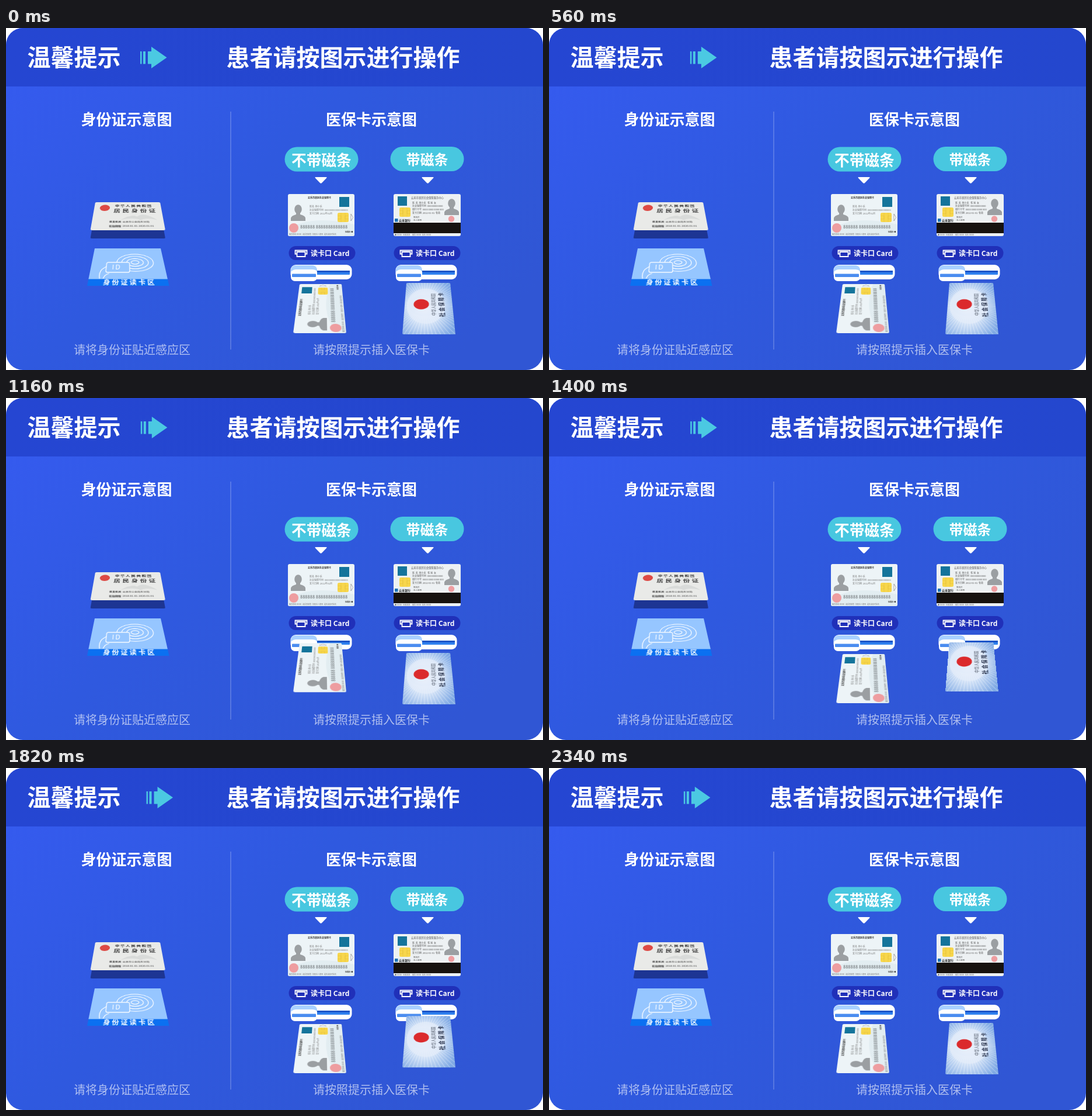
An HTML page for the animation above (2.36 s loop, 920 px wide and 585 px high).

```html
<!DOCTYPE html>
<html lang="zh-CN">
<head>
<meta charset="utf-8">
<title>温馨提示</title>
<style>
html, body { margin: 0; width: 100%; height: 100%; overflow: hidden; background: #fff; }
#stage { position: relative; width: 920px; height: 585px; overflow: hidden; }
svg { position: absolute; left: 0; top: 0; display: block; }
text { font-family: "Noto Sans CJK SC", "Noto Sans CJK", "Noto Sans", sans-serif; white-space: pre; }
.b { font-weight: 700; }
.warp { transform-origin: 0 0; overflow: hidden; }
.slot { position: absolute; left: 0; top: 418px; width: 920px; height: 167px; overflow: hidden; }
.slot > div { position: absolute; left: 0; top: -418px; }
</style>
</head>
<body>
<div id="stage">
<svg width="920" height="585">
  <defs>
    <linearGradient id="body" x1="0" y1="0" x2="1" y2=".75">
      <stop offset="0" stop-color="#365bf1"/><stop offset=".5" stop-color="#2f59df"/><stop offset="1" stop-color="#3056d4"/>
    </linearGradient>
    <linearGradient id="head"><stop offset="0" stop-color="#2546d2"/><stop offset="1" stop-color="#2447ce"/></linearGradient>
    <radialGradient id="sky" cx=".5" cy=".42" r=".68">
      <stop offset="0" stop-color="#f1f6fd"/><stop offset=".5" stop-color="#cfe0f6"/><stop offset="1" stop-color="#7fa9e4"/>
    </radialGradient>
    <clipPath id="round"><rect width="920" height="585" rx="29"/></clipPath>
    <g id="person" fill="#9b9fa2">
      <ellipse cx="12.5" cy="8" rx="6.3" ry="7.8"/>
      <path d="M9 13h7v4q8 2 9 6v5H0v-5q1-4 9-6z"/>
    </g>
    <g id="chip">
      <rect width="19" height="16" rx="2.5" fill="#f7d64c"/>
      <path d="M0 5.3h6v5.400H0M19 5.300h-6v5.400h6M6 0v16M13 0v16" fill="none" stroke="#e3bc3a" stroke-width=".5"/>
    </g>
    <g id="front">
      <rect width="114" height="72" rx="3" fill="#edf4f7"/>
      <path d="M0 60Q40 35 114 52V69q0 3-3 3H3q-3 0-3-3z" fill="#e2edf1"/>
      <text class="b" x="34" y="8" font-size="4" fill="#333">云禾市居民社会保障卡</text>
      <rect x="88" y="5" width="17" height="17" fill="#14749b"/>
      <use href="#person" x="5" y="18"/>
      <g font-size="4" fill="#777">
        <text x="37" y="22.500">姓名  林小禾</text>
        <text x="37" y="28.500">社会保障号码  000000000000000000</text>
        <text x="37" y="34.500">发卡日期  2012年01月</text>
        <text x="2" y="70" font-size="3">服务热线 00000   请妥善保管   仅限本人使用   遗失请及时挂失</text>
        <text class="b" x="98" y="66" font-size="3.200" fill="#333">社保卡 ●</text>
      </g>
      <use href="#chip" x="85" y="32"/>
      <path d="M108 34l3.500 6-3.500 6z" fill="#fff" stroke="#888" stroke-width=".7"/>
      <circle cx="10" cy="58" r="8" fill="#ee9da0"/>
      <text class="b" x="21" y="58.500" font-size="7.100" fill="#858b8e">888888 8888888888888</text>
    </g>
    <g id="back">
      <rect width="115" height="72" rx="3" fill="#edf1f3"/>
      <text x="30" y="7.500" font-size="4.300" fill="#555">云禾市居民社会保障服务中心</text>
      <rect x="7" y="4" width="16" height="16" fill="#14749b"/>
      <use href="#chip" x="10" y="23"/>
      <g font-size="4" fill="#555">
        <text x="32" y="16.500">姓  名  林小禾   性 别  女</text>
        <text x="32" y="22">社会保障号码  000000000000</text>
        <text x="32" y="28">银行卡号  0000 0000 0000 000</text>
        <text x="32" y="33.500">发卡日期  2012-01-01  有效</text>
        <text x="34" y="41" font-size="3.500">签名栏</text>
        <text x="34" y="45.500" font-size="3.500">本人使用</text>
      </g>
      <rect x="34" y="46" width="56" height="3" fill="#fafafa"/>
      <rect x="2" y="42" width="5.500" height="5.500" fill="#1c72b8"/>
      <text class="b" x="9" y="46.500" font-size="5" fill="#222">云禾银行</text>
      <use href="#person" x="87" y="8"/>
      <circle cx="99" cy="42.500" r="5.200" fill="#ee9da0"/>
      <rect y="49" width="115" height="18" fill="#17120f"/>
      <text x="2" y="71" font-size="3" fill="#666">● 00000   社保咨询      服务 00000   挂失 00000</text>
    </g>
    <g id="reader">
      <rect x=".5" width="114" height="24" rx="12" fill="#2030b9"/>
      <path d="M14 13.500h-2.500v-6h20v6H29M14.500 10h14v8h-14z" fill="none" stroke="#fff" stroke-width="1.800"/>
      <text class="b" x="38" y="17" font-size="12" fill="#fff">读卡口 Card</text>
      <rect x="3.500" y="32" width="105" height="25" rx="9" fill="#fff"/>
      <rect x="46" y="42" width="59" height="7" rx="1" fill="#2f80ee"/>
      <rect x="46" y="42" width="59" height="3" fill="#1b55c8"/>
      <rect x="4" y="33" width="45" height="27" rx="8" fill="#a9d1ff"/>
      <path d="M4 44q4-4 9-4h28q8 0 8 6v7q0 7-8 7H12q-8 0-8-8z" fill="#fff"/>
      <rect x="6" y="47.500" width="41" height="5.500" rx="1" fill="#4b8df0"/>
    </g>
    <path id="tip" d="M-9 0H9Q11 0 9.500 1.800L1.500 10Q0 11.500-1.500 10L-9.500 1.800Q-11 0-9 0z" fill="#fff"/>
  </defs>

  <g clip-path="url(#round)">
    <rect width="920" height="585" fill="url(#body)"/>
    <rect width="920" height="100" fill="url(#head)"/>
  </g>
  <path d="M385 143V550" stroke="#fff" stroke-opacity=".25" stroke-width="1.500"/>
  <g class="b" fill="#fff">
    <text x="36.500" y="64.500" font-size="40">温馨提示</text>
    <text x="377.500" y="64.500" font-size="40">患者请按图示进行操作</text>
    <text x="128.500" y="166" font-size="26">身份证示意图</text>
    <text x="548" y="166" font-size="26">医保卡示意图</text>
  </g>
  <g fill="#fff" fill-opacity=".62" font-size="20">
    <text x="116" y="558">请将身份证贴近感应区</text>
    <text x="526" y="558">请按照提示插入医保卡</text>
  </g>
  <g fill="#48c7e0">
    <rect x="477.500" y="203.500" width="126" height="42" rx="21"/>
    <rect x="658.500" y="203" width="126" height="42" rx="21"/>
  </g>
  <g class="b" fill="#fff">
    <text x="489" y="236" font-size="25.700">不带磁条</text>
    <text x="685.500" y="233.500" font-size="24">带磁条</text>
  </g>
  <use href="#tip" x="539.500" y="255"/>
  <use href="#tip" x="722.500" y="255"/>
  <use href="#front" x="483" y="284"/>
  <use href="#back" x="664" y="284"/>
  <use href="#reader" x="484" y="373"/>
  <use href="#reader" x="664" y="373"/>
  <path id="arrow" fill="#4bc9e2" d="M230 40h2.500v21.500h-2.500zM235 40h4v21.500h-4zM243 40h6v-8L275.500 50.500 249 69v-7.500h-6z"/>
</svg>

<svg class="warp" id="pad" width="130" height="80">
  <rect width="130" height="69" fill="#96c6ff"/>
  <rect y="68" width="130" height="12" fill="#0b70f1"/>
  <g id="rings" fill="none" stroke="#fff" stroke-width="1.300"></g>
  <rect x="27" y="34" width="41" height="21" rx="3" fill="#96c6ff" stroke="#fff" stroke-width="1.300"/>
  <text x="37" y="49" font-size="13" letter-spacing="2" fill="#fff">ID</text>
  <path d="M18 67Q15 56 20 49L27 43M24 67Q25 60 33 57" fill="none" stroke="#fff" stroke-width="1.300"/>
  <text class="b" x="24.500" y="78.500" font-size="11.500" letter-spacing="2.800" fill="#fff">身份证读卡区</text>
</svg>

<svg class="warp" id="shade" width="120" height="75"><rect width="120" height="75" rx="2" fill="#1d3593"/></svg>
<svg class="warp" id="idcard" width="120" height="75">
  <rect width="120" height="75" rx="3" fill="#e9eae8"/>
  <path d="M48 50Q66 34 76 41Q88 28 110 50Q92 43 82 50Q66 42 48 50z" fill="#d9dbda"/>
  <circle cx="19" cy="17" r="9" fill="#dc4a45"/>
  <g fill="#3a3a3a">
    <text class="b" x="37" y="14.500" font-size="8" letter-spacing="1.700">中华人民共和国</text>
    <text class="b" x="35" y="30" font-size="12" letter-spacing="3.600">居民身份证</text>
    <text x="29" y="56" font-size="5"><tspan class="b">签发机关</tspan>  云禾市公安局东分局</text>
    <text x="29" y="67" font-size="5"><tspan class="b">有效期限</tspan>  2010.01.01-2020.01.01</text>
  </g>
</svg>

<div class="slot"><div id="plain">
  <svg class="warp" id="plainCard" width="114" height="72"><use href="#front"/></svg>
</div></div>
<div class="slot"><div id="strip">
  <svg class="warp" id="stripCard" width="115" height="72">
    <rect width="115" height="72" rx="2" fill="url(#sky)"/>
    <g id="rays" stroke="#fff" stroke-opacity=".5" stroke-width=".8"></g>
    <ellipse cx="60" cy="32" rx="40" ry="29" fill="#e6effa" fill-opacity=".65"/>
    <circle cx="62" cy="25" r="11.500" fill="#db2a2c"/>
    <text x="62" y="46" font-size="7.200" text-anchor="middle" fill="#4b5260">中华人民共和国</text>
    <text class="b" x="63" y="59" font-size="9" letter-spacing="2.500" text-anchor="middle" fill="#26304a">社会保障卡</text>
  </svg>
</div></div>
</div>

<script>
const LOOP = 2360, STEP = 20;
const $ = id => document.getElementById(id);
const lerp = (a, b, k) => a + (b - a) * k;

// Maps an element's box onto four corners: top left, top right, bottom right, bottom left.
function warp(el, [x0, y0, x1, y1, x2, y2, x3, y3]) {
  const w = +el.getAttribute('width'), h = +el.getAttribute('height');
  const dx1 = x1 - x2, dx2 = x3 - x2, sx = x0 - x1 + x2 - x3;
  const dy1 = y1 - y2, dy2 = y3 - y2, sy = y0 - y1 + y2 - y3;
  const det = dx1 * dy2 - dx2 * dy1;
  const g = (sx * dy2 - dx2 * sy) / det, k = (dx1 * sy - sx * dy1) / det;
  const m = [
    (x1 - x0 + g * x1) / w, (y1 - y0 + g * y1) / w, 0, g / w,
    (x3 - x0 + k * x3) / h, (y3 - y0 + k * y3) / h, 0, k / h,
    0, 0, 1, 0,
    x0, y0, 0, 1
  ];
  el.style.transform = `matrix3d(${m.map(v => v.toFixed(8))})`;
}

// Rises from 0 at a to 1 at b, holds to c, falls back to 0 at d.
function trip(t, a, b, c, d) {
  if (t <= a || t >= d) return 0;
  if (t < b) return (t - a) / (b - a);
  return t <= c ? 1 : (d - t) / (d - c);
}

function sway(t) {
  const p = (t * 6 / LOOP) % 1;
  const line = 1 - Math.abs(1 - 2 * p), wave = (1 - Math.cos(2 * Math.PI * p)) / 2;
  return 13.2 * (line + wave) / 2;
}

$('rings').innerHTML = [7, 15, 24, 33]
  .map(r => `<ellipse cx="78" cy="34" rx="${r}" ry="${r * .58}"/>`).join('');
$('rays').innerHTML = Array.from({ length: 72 }, (_, i) => {
  const a = i * Math.PI / 36, c = Math.cos(a), s = Math.sin(a);
  return `<path d="M${60 + 24 * c} ${30 + 24 * s}L${60 + 90 * c} ${30 + 90 * s}"/>`;
}).join('');

const HIGH = [153, 298, 264, 298, 273, 346, 144.5, 346];
const LOW = [153, 377, 264, 377, 275, 429.5, 144, 429.5];
warp($('pad'), [152, 377, 265, 377, 279.5, 441, 139, 441]);
warp($('plainCard'), [492, 522, 503, 438, 575, 438, 583, 522]);
warp($('stripCard'), [679, 524, 686, 436, 761, 436, 770, 524]);

function draw(t) {
  $('arrow').setAttribute('transform', `translate(${sway(t)} 0)`);
  const k = trip(t, 0, 240, 300, 540);
  const card = HIGH.map((v, i) => lerp(v, LOW[i], k));
  warp($('idcard'), card);
  warp($('shade'), card.map((v, i) => i % 2 ? v + 14 * (1 - k) : v));
  $('plain').style.transform = `translateY(${-50 * trip(t, 620, 950, 950, 1285)}px)`;
  $('strip').style.transform = `translateY(${-50 * trip(t, 1270, 1570, 1590, 1890)}px)`;
}

const start = performance.now();
function tick() {
  const t = (performance.now() - start) % LOOP;
  draw(Math.floor(t / STEP) * STEP);
  requestAnimationFrame(tick);
}
tick();
</script>
</body>
</html>
```
